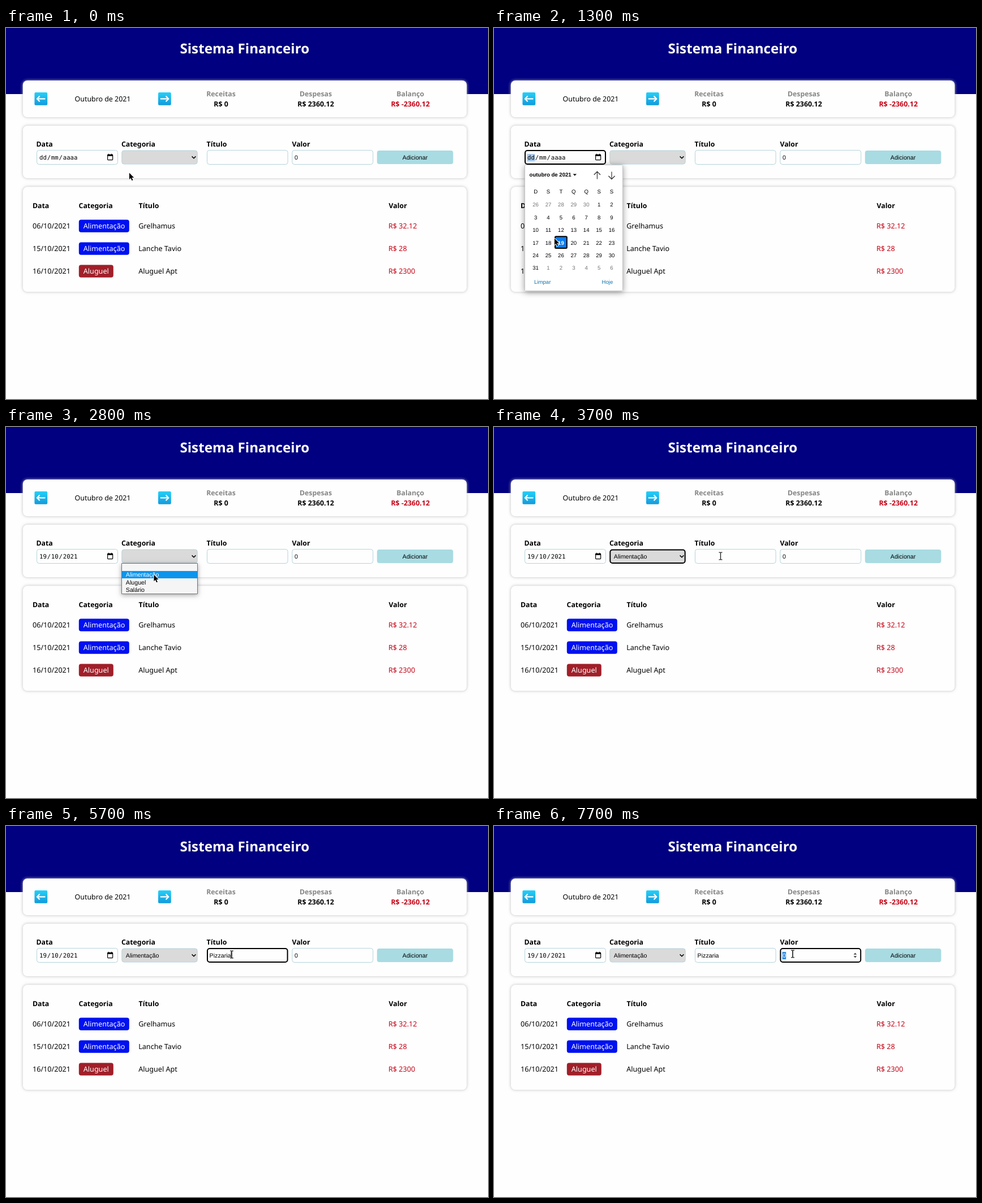
An HTML page with a canvas for the animation above (8 s loop, 852 by 657 pixels).

```html
<!DOCTYPE html>
<html lang="pt-BR">
<head>
<meta charset="utf-8">
<title>Sistema Financeiro</title>
<style>
  html, body { margin: 0; width: 100%; height: 100%; overflow: hidden; background: #fefefe; }
  canvas { display: block; width: 852px; height: 657px; }
</style>
</head>
<body>
<canvas id="stage" width="852" height="657"></canvas>
<script>
const ctx = document.getElementById('stage').getContext('2d');
const LOOP = 8000, STEP = 100;
const SANS = '"Noto Sans", sans-serif';
const ARIAL = '"Liberation Sans", sans-serif';
const MONO = '"DejaVu Sans Mono", monospace';
const BODY = `12.6px ${SANS}`, BOLD = `bold 12.3px ${SANS}`;
const CONTROL = `10.67px ${ARIAL}`, SMALL = `9.6px ${ARIAL}`;
const PALE = '#b4d4dc', RED = '#c60014', GREY = '#757575', LINK = '#1276ad';

// Pointer path: time, x, y
const PATH = [
  [0, 217.5, 256], [100, 217.5, 256], [700, 183, 225], [1000, 183, 225],
  [1300, 106.5, 372], [1500, 112, 378], [1600, 114, 376], [1900, 171, 337],
  [2300, 334, 228], [2400, 331, 225], [2500, 331, 225], [2700, 278, 273],
  [2800, 261, 261], [3200, 261, 261], [3400, 395.5, 218], [3500, 395.5, 218],
  [3700, 400.5, 228.5], [4000, 400.5, 228.5], [4100, 399, 227.5], [6400, 399, 227.5],
  [6600, 432, 229], [6700, 432, 229], [7100, 531, 228], [7200, 528, 226.5]
];
const TYPED_AT = [4700, 4900, 5000, 5100, 5200, 5400, 5600, 5700];
const FIELDS = { date: [54, 144], select: [204.3, 134.4], title: [355, 143.6], value: [505.4, 143.8] };
const ROWS = [
  ['06/10/2021', 'Alimentação', 'Grelhamus', 'R$ 32.12'],
  ['15/10/2021', 'Alimentação', 'Lanche Tavio', 'R$ 28'],
  ['16/10/2021', 'Aluguel', 'Aluguel Apt', 'R$ 2300']
];
const PILLS = { 'Alimentação': ['#0010f0', 89], 'Aluguel': ['#a01f29', 61] };

function text(s, x, y, font = BODY, color = '#000', align = 'left') {
  ctx.font = font;
  ctx.fillStyle = color;
  ctx.textAlign = align;
  ctx.fillText(s, x, y);
}

function box(x, y, w, h, r, fill, stroke, line = 1) {
  ctx.beginPath();
  ctx.roundRect(x, y, w, h, r);
  if (fill) { ctx.fillStyle = fill; ctx.fill(); }
  if (stroke) { ctx.strokeStyle = stroke; ctx.lineWidth = line; ctx.stroke(); }
}

function shape(points, fill) {
  ctx.beginPath();
  points.forEach(([x, y]) => ctx.lineTo(x, y));
  ctx.closePath();
  ctx.fillStyle = fill;
  ctx.fill();
}

function line(points, color, width) {
  ctx.beginPath();
  points.forEach(([x, y], i) => i ? ctx.lineTo(x, y) : ctx.moveTo(x, y));
  ctx.strokeStyle = color;
  ctx.lineWidth = width;
  ctx.stroke();
}

function withShadow(color, blur, dy, draw) {
  ctx.save();
  ctx.shadowColor = color;
  ctx.shadowBlur = blur;
  ctx.shadowOffsetY = dy;
  draw();
  ctx.restore();
}

function card(y, h) {
  withShadow('#bcbcbc', 5, 0, () => box(29.8, y, 784.6, h, 8, '#fefefe'));
}

function arrowTile(cx, dir) {
  const cy = 125.4;
  const g = ctx.createLinearGradient(0, 114, 0, 137);
  g.addColorStop(0, '#25d0f8');
  g.addColorStop(1, '#1399dc');
  box(cx - 11.4, cy - 11.4, 22.8, 22.8, 2, g);
  const at = (dx, dy) => [cx + dir * dx, cy + dy];
  line([at(-7.6, 0), at(6, 0)], '#fff', 2.2);
  line([at(2.2, -4.8), at(6.8, 0), at(2.2, 4.8)], '#fff', 2.2);
}

function field(name, focused, fill = '#fefefe') {
  const [x, w] = FIELDS[name];
  const pad = name === 'select' ? 0.5 : 0;
  if (focused) box(x + 1, 217 + pad, w - 2, 24 - pad, 4, fill, '#000', 2);
  else box(x + 0.5, 216.5 + pad, w - 1, 25 - 2 * pad, 4, fill, PALE);
}

function page() {
  ctx.fillStyle = '#fefefe';
  ctx.fillRect(0, 0, 852, 657);
  ctx.fillStyle = '#000080';
  ctx.fillRect(0, 0, 852, 117);
  text('Sistema Financeiro', 421.8, 44.6, `bold 24.2px ${SANS}`, '#fff', 'center');

  card(93, 65);
  arrowTile(61.8, -1);
  arrowTile(280.4, 1);
  text('Outubro de 2021', 171, 130.3, `12.4px ${SANS}`, '#000', 'center');
  [['Receitas', 'R$ 0', 380], ['Despesas', 'R$ 2360.12', 547.5], ['Balanço', 'R$ -2360.12', 714.7]]
    .forEach(([label, sum, x], i) => {
      text(label, x, 121, BOLD, '#868686', 'center');
      text(sum, x, 139.2, `bold 12.4px ${SANS}`, i === 2 ? RED : '#000', 'center');
    });

  card(173, 93);
  text('Data', 53.4, 209.6, BOLD);
  text('Categoria', 204, 210.2, BOLD);
  text('Título', 354.6, 209.6, BOLD);
  text('Valor', 505.4, 209.6, BOLD);

  card(281.3, 186);
  [['Data', 47], ['Categoria', 128.6], ['Título', 234.6], ['Valor', 676.6]]
    .forEach(([s, x]) => text(s, x, 319.2, BOLD));
  ROWS.forEach(([date, kind, name, sum], i) => {
    const y = 355.4 + 40 * i;
    const [color, w] = PILLS[kind];
    text(date, 47, y);
    box(128.8, y - 16, w, 22.4, 4, color);
    text(kind, 136.8, y, BODY, '#fff');
    text(name, 234.2, y);
    text(sum, 676, y, BODY, RED);
  });
}

function dateField(focused, filled) {
  field('date', focused);
  if (focused) { ctx.fillStyle = '#a9caec'; ctx.fillRect(58.6, 223, 13.6, 13); }
  const parts = filled ? ['19', '/', '10', '/', '2021'] : ['dd', '/', 'mm', '/', 'aaaa'];
  let x = 59;
  for (const part of parts) {
    text(part, x, 233, `10.67px ${MONO}`);
    x += 6.42 * part.length + 0.8;
  }
  box(179.6, 224.4, 9, 9.2, 0.8, null, '#000', 1.2);
  ctx.fillStyle = '#000';
  ctx.fillRect(179.2, 224, 9.8, 2.8);
  ctx.fillRect(180.8, 222.8, 1.4, 2);
  ctx.fillRect(186, 222.8, 1.4, 2);
}

function form(s) {
  dateField(s.focus === 'date', s.dated);
  field('select', s.focus === 'select', '#dadada');
  if (s.chosen) text('Alimentação', 211.8, 233, CONTROL);
  line([[328.6, 227.4], [332, 230.8], [335.4, 227.4]], '#000', 1.5);

  field('title', s.focus === 'title');
  text(s.typed, 359.6, 233, CONTROL);
  const end = 359.6 + ctx.measureText(s.typed).width;

  field('value', s.focus === 'value');
  if (s.selected) { ctx.fillStyle = '#2f8ade'; ctx.fillRect(509.6, 223, 6.6, 13); }
  text('0', 510, 233, CONTROL, s.selected ? '#fff' : '#000');
  if (s.focus === 'value' || s.pos[0] > 505) {
    shape([[635.6, 227.8], [638.4, 224.6], [641.2, 227.8]], '#444');
    shape([[635.6, 230.2], [638.4, 233.4], [641.2, 230.2]], '#444');
  }
  if (s.caret) {
    ctx.fillStyle = '#000';
    ctx.fillRect(s.focus === 'title' ? Math.floor(end) : 516, 223, 1, 12);
  }

  box(655.8, 217, 134.6, 24, 4, '#a8dbe2');
  text('Adicionar', 723, 233, CONTROL, '#000', 'center');
}

function calendar() {
  withShadow('rgba(0,0,0,.4)', 11, 2, () => box(54, 242, 174, 224, 1, '#fff'));
  box(54.5, 242.5, 173, 223, 1, '#fff', '#c4c4c4');
  text('outubro de 2021', 62.6, 263.2, `bold 9.6px ${ARIAL}`);
  shape([[139.6, 258.4], [146, 258.4], [142.8, 261.8]], '#000');
  for (const [x, d] of [[182.4, -1], [208, 1]]) {
    line([[x, 261 - 6.4 * d], [x, 261 + 6.4 * d]], '#222', 1.1);
    line([[x - 5.6, 261 + d], [x, 261 + 6.6 * d], [x + 5.6, 261 + d]], '#222', 1.1);
  }
  const colX = c => 73.6 + 22.4 * c;
  [...'DSTQQSS'].forEach((s, c) => text(s, colX(c), 293, SMALL, '#000', 'center'));
  for (let i = 0; i < 42; i++) {
    const n = i - 4, x = colX(i % 7), y = 316.3 + 22.4 * Math.floor(i / 7);
    const today = n === 19;
    if (today) box(x - 10.4, y - 14.2, 20.8, 20.8, 1.5, '#0b7cf0', '#000', 2);
    const day = n < 1 ? n + 30 : n > 31 ? n - 31 : n;
    const color = today ? '#fff' : n < 1 || n > 31 ? GREY : '#000';
    text(day, x, y, today ? `bold 9.6px ${ARIAL}` : SMALL, color, 'center');
  }
  text('Limpar', 71, 453, SMALL, LINK);
  text('Hoje', 190.6, 453, SMALL, LINK);
}

function dropdown(y) {
  withShadow('rgba(0,0,0,.35)', 8, 2, () => box(204, 241, 135, 55, 0, '#f5f5f5'));
  box(204.5, 241.5, 134, 54, 0, '#f5f5f5', '#737373');
  const hot = Math.max(0, Math.min(3, Math.floor((y - 242) / 13.3)));
  ['', 'Alimentação', 'Aluguel', 'Salário'].forEach((s, i) => {
    const top = 242 + 13.3 * i;
    if (i === hot) { ctx.fillStyle = '#0b95ee'; ctx.fillRect(205, Math.round(top), 133, 13); }
    text(s, 211.8, top + 10, CONTROL, i === hot ? '#fff' : '#000');
  });
}

function pointer([x, y]) {
  const within = ([left, w]) => x > left && x < left + w;
  ctx.save();
  ctx.translate(x, y);
  ctx.lineJoin = 'round';
  if (y > 216 && y < 242 && (within(FIELDS.title) || within(FIELDS.value))) {
    for (const [color, w] of [['#fff', 2.6], ['#222', 1.2]]) {
      line([[-3, -6.4], [-0.6, -6.4], [0, -5.6], [0, 5.6], [-0.6, 6.4], [-3, 6.4]], color, w);
      line([[3, -6.4], [0.6, -6.4], [0, -5.6], [0, 5.6], [0.6, 6.4], [3, 6.4]], color, w);
    }
  } else {
    const outline = [[0.4, 0.4], [0.4, 12.2], [3, 9.8], [5, 14.2], [6.9, 13.3], [4.9, 9.1], [8.6, 8.9]];
    line([...outline, outline[0]], '#fff', 1.8);
    shape(outline, '#000');
  }
  ctx.restore();
}

function position(t) {
  const i = PATH.findIndex(k => k[0] > t);
  if (i < 0) return PATH[PATH.length - 1].slice(1);
  const [t0, x0, y0] = PATH[i - 1], [t1, x1, y1] = PATH[i];
  const k = (t - t0) / (t1 - t0);
  return [x0 + (x1 - x0) * k, y0 + (y1 - y0) * k];
}

function stateAt(t) {
  const during = (a, b) => t >= a && t < b;
  let focus = '';
  if (during(700, 2400)) focus = 'date';
  else if (during(3200, 3900)) focus = 'select';
  else if (during(3900, 7200)) focus = 'title';
  else if (t >= 7200) focus = 'value';
  return {
    focus,
    pos: position(t),
    dated: t >= 1600,
    chosen: t >= 3200,
    typed: 'Pizzaria'.slice(0, TYPED_AT.filter(k => k <= t).length),
    caret: during(3900, 4500) || during(4700, 6300) || during(6800, 7700) ,
    selected: t >= 7700,
    calendar: during(900, 1600),
    dropdown: during(2400, 3200)
  };
}

function draw(now) {
  const t = Math.floor((now % LOOP) / STEP) * STEP;
  const s = stateAt(t);
  ctx.textRendering = 'geometricPrecision';
  page();
  form(s);
  if (s.calendar) calendar();
  if (s.dropdown) dropdown(s.pos[1]);
  pointer(s.pos);
}

const start = performance.now();
function tick() {
  draw(performance.now() - start);
  requestAnimationFrame(tick);
}
tick();
</script>
</body>
</html>
```
